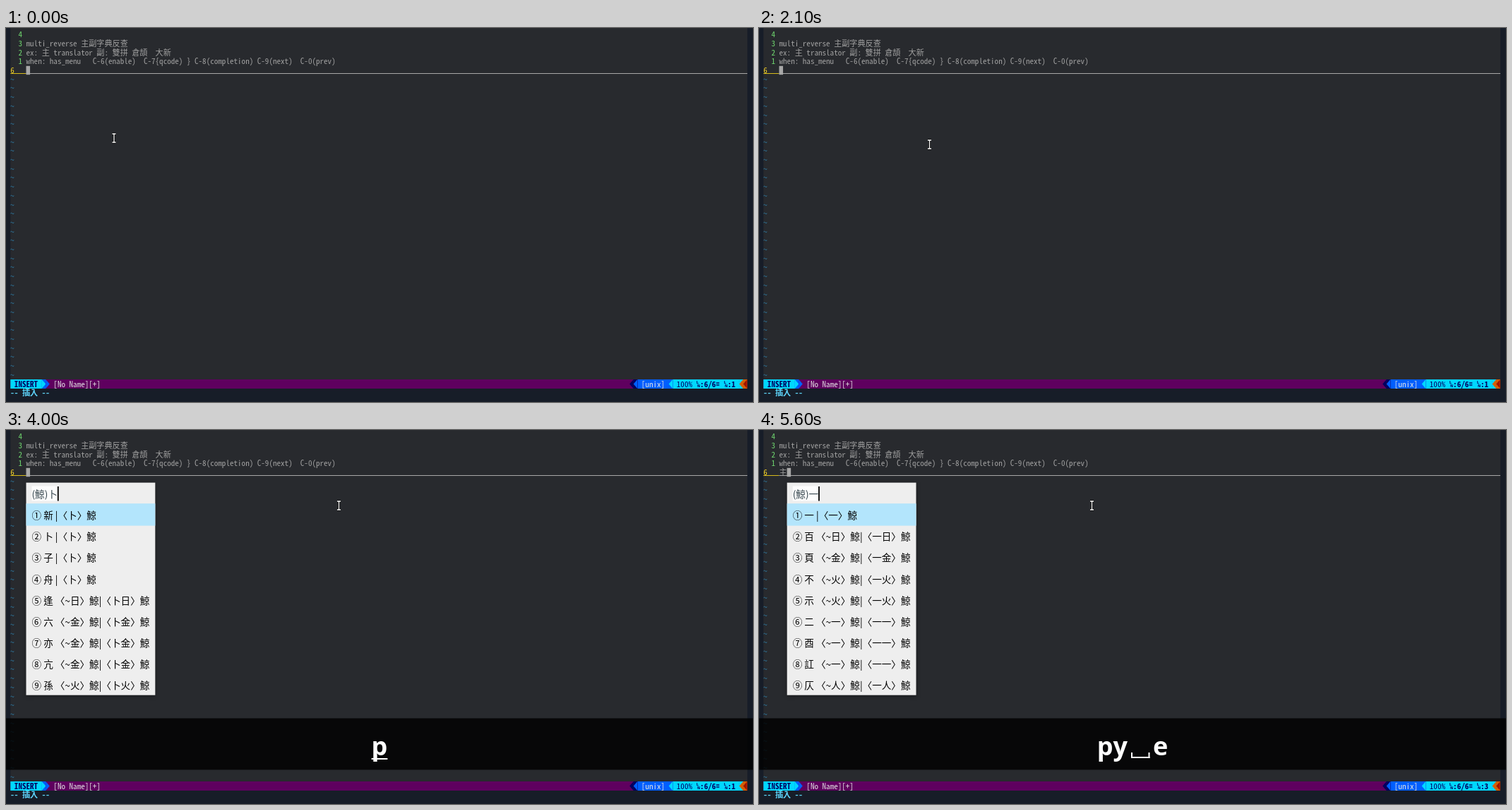
Animation of 1058x530 px, one loop 8 s. Source, as an HTML page with a canvas:

```html
<!DOCTYPE html>
<html lang="zh-Hant">
<head>
<meta charset="utf-8">
<style>
html, body { margin: 0; width: 100%; height: 100%; overflow: hidden; background: #171d28 }
canvas { display: block }
</style>
</head>
<body>
<canvas id="stage" width="1058" height="530"></canvas>
<script>
const ctx = document.getElementById('stage').getContext('2d');
const LOOP = 8000, CELL = 5.55, ROW = 12.7, LEFT = 6.3, RIGHT = 1050;
const MONO = '11.1px "Noto Sans Mono CJK TC", "Noto Sans Mono", monospace';
const HAN = '13.6px "Noto Sans CJK TC", "Noto Sans", sans-serif';
const KEYS = 'bold 36px "Noto Sans", sans-serif';

const col = n => LEFT + n * CELL;
const baseline = n => 13.2 + n * ROW;

function rect(x, y, w, h, color) {
  ctx.fillStyle = color;
  ctx.fillRect(x, y, w, h);
}
function text(str, x, y, color, font) {
  ctx.font = font;
  ctx.fillStyle = color;
  ctx.fillText(str, x, y);
}
const cells = (str, c, r, color, weight = '') =>
  text(str, col(c), baseline(r), color, weight + MONO);

const notes = [
  '',
  'multi_reverse 主副字典反查',
  'ex: 主 translator 副: 雙拼 倉頡  大新',
  'when: has_menu   C-6(enable)  C-7{qcode) } C-8(completion) C-9(next)  C-0(prev)'
];

// Candidate rows: "character code", where code follows the typed prefix.
const coded = (prefix, plain, rest) => [
  ...[...plain].map(c => `${c} |〈${prefix}〉鯨`),
  ...rest.split(' ').map(s => {
    const [c, ...code] = s, tail = code.join('');
    return `${c} 〈~${tail}〉鯨|〈${prefix}${tail}〉鯨`;
  })
];
const linked = '見田山 要魚女 題日人一金 動竹土大尸 任人水 席中中月 板木竹水 機木女戈 力大尸'
  .split(' ').map(s => `${s[0]} (聯)|〈${s.slice(1)}〉鯨`);

const menus = {
  ascii: { label: 'A' },
  han: { label: '中' },
  first: { preedit: '(鯨)卜', rows: coded('卜', '新卜子舟', '逢日 六金 亦金 亢金 孫火') },
  second: { preedit: '(鯨)卜土', rows: coded('卜土', '主', '遠口女 達廿手 逵金土 遨尸大 遶土山 逹土手 麈土火 遼火日') },
  linked: { preedit: '見[聯]', rows: linked },
  third: { preedit: '(鯨)一', rows: coded('一', '一', '百日 頁金 不火 示火 二一 酉一 訌一 仄人') }
};

const start = { at: 0, typed: '', column: 1 };
const changes = [
  { at: 900, menu: 'ascii', menuX: 28.5 },
  { at: 2000, menu: null },
  { at: 3100, typed: 'p', column: 2, keys: 'p' },
  { at: 3400, typed: '', column: 1, keys: '', menu: 'han' },
  { at: 3800, menu: null },
  { at: 4000, menu: 'first', keys: 'p', underline: true },
  { at: 4200, underline: false },
  { at: 4600, menu: 'second', keys: 'py', underline: true },
  { at: 4800, underline: false },
  { at: 5100, menu: 'linked', typed: '主', column: 3, keys: 'py␣', underline: true },
  { at: 5400, menuX: 39.7, underline: false },
  { at: 5600, menu: 'third', keys: 'py␣e' }
];
const stateAt = t => Object.assign({}, start, ...changes.filter(c => c.at <= t));

function pointerAt(t) {
  if (t >= 3600) return [471.5, 107];
  if (t >= 3400) return null;
  const path = [[900, 153, 156], [1200, 159, 155], [1400, 241.5, 165]];
  const now = Math.floor(t / 100) * 100;
  if (now <= path[0][0]) return path[0].slice(1);
  for (let i = 1; i < path.length; i++) {
    const [t0, x0, y0] = path[i - 1], [t1, x1, y1] = path[i];
    if (now <= t1) {
      const k = (now - t0) / (t1 - t0);
      return [x0 + (x1 - x0) * k, y0 + (y1 - y0) * k];
    }
  }
  return path[path.length - 1].slice(1);
}

function drawPointer([x, y]) {
  for (const [color, width] of [['#000', 3], ['#fff', 1.3]]) {
    ctx.strokeStyle = color;
    ctx.lineWidth = width;
    ctx.beginPath();
    ctx.moveTo(x - 2.5, y - 6);
    ctx.lineTo(x + 2.5, y - 6);
    ctx.moveTo(x, y - 6);
    ctx.lineTo(x, y + 6);
    ctx.moveTo(x - 2.5, y + 6);
    ctx.lineTo(x + 2.5, y + 6);
    ctx.stroke();
  }
}

function drawEditor({ typed }) {
  rect(0, 0, 1058, 530, '#171d28');
  rect(LEFT, 0, RIGHT - LEFT, 511, '#282a2e');
  notes.forEach((line, i) => {
    cells(String(4 - i), 2, i, '#6fd76f');
    cells(line, 4, i, '#a0a0a0');
  });
  cells('6', 0, 4, '#f5d327');
  rect(LEFT, 64, 22.2, 1, '#d7bb1c');
  rect(28.5, 64, RIGHT - 28.5, 1, '#a8a8a8');
  cells(typed, 4, 4, '#a0a0a0');
  const width = typed === '主' ? 2 : typed.length;
  rect(col(4 + width), 53.8, CELL, 12.4, '#a8a8a8');
  for (let r = 5; r < 39; r++) cells('~', 0, r, '#2f87b5');
}

function arrow(c, dir, color, back) {
  const x = col(c), tip = dir > 0 ? x + CELL : x, base = dir > 0 ? x : x + CELL;
  rect(x, 498, CELL + 0.3, 13, back);
  ctx.fillStyle = color;
  ctx.beginPath();
  ctx.moveTo(base, 498);
  ctx.lineTo(tip, 504.5);
  ctx.lineTo(base, 511);
  ctx.fill();
}

function stackedMark(c) {
  const font = 'bold 6px "Noto Sans Mono", monospace';
  text('L', col(c) + 0.3, 504, '#00005f', font);
  text('N', col(c) + 1.8, 509, '#00005f', font);
}

function drawStatus({ column }) {
  const cyan = '#00d7ff', blue = '#005fff', purple = '#5f005f', navy = '#00005f';
  const span = (a, b, color) => rect(col(a), 498, (b - a) * CELL + 0.3, 13, color);
  span(0, 188, purple);
  span(0, 8, cyan);
  span(160, 168, blue);
  span(169, 186, cyan);
  arrow(8, 1, cyan, blue);
  arrow(9, 1, blue, purple);
  arrow(158, -1, navy, purple);
  arrow(159, -1, blue, navy);
  arrow(168, -1, cyan, blue);
  arrow(186, -1, '#d75f00', cyan);
  arrow(187, -1, '#a01400', '#d75f00');
  cells('INSERT', 1, 39, navy, 'bold ');
  cells('[No Name][+]', 11, 39, '#e4e4e4');
  cells('[unix]', 161, 39, '#e4e4e4');
  cells('100%', 170, 39, navy);
  stackedMark(175);
  cells(':6/6', 176, 39, navy, 'bold ');
  for (const y of [502, 504, 506]) rect(col(180) + 0.6, y, 4.4, 1, navy);
  stackedMark(182);
  cells(':' + column, 183, 39, navy, 'bold ');
  cells('-- 插入 --', 0, 40, '#5fd7ff', 'bold ');
}

function drawMenu({ menu, menuX }) {
  const { label, preedit, rows = [] } = menus[menu];
  const pitch = 30.14, pad = 8, top = 74.6, x = menuX + pad;
  const lines = label ? [label] : [preedit, ...rows.map((r, i) => '①②③④⑤⑥⑦⑧⑨'[i] + ' ' + r)];
  ctx.font = HAN;
  const widths = lines.map(l => ctx.measureText(l).width);
  const width = Math.max(...widths) + 2 * pad;
  ctx.save();
  ctx.shadowColor = 'rgba(0,0,0,.45)';
  ctx.shadowBlur = 7;
  ctx.shadowOffsetY = 1;
  rect(menuX, top, width, lines.length * pitch - 0.3, '#eee');
  ctx.restore();
  if (preedit) {
    rect(x, 79.5, widths[0], 21, '#fcfcfc');
    rect(x + widths[0], 80, 1.8, 20.5, '#000');
    rect(menuX, 104.2, width, 31.4, '#b3e5fc');
  }
  lines.forEach((l, i) => text(l, x, 96 + i * pitch, preedit && !i ? '#37474f' : '#000', HAN));
}

function drawKeys({ keys, underline }) {
  rect(0, 408.5, 1058, 73, 'rgba(0,0,0,.83)');
  ctx.font = KEYS;
  const widths = [...keys].map(k => k === '␣' ? 36 : ctx.measureText(k).width);
  let x = 529 - widths.reduce((a, b) => a + b, 0) / 2;
  [...keys].forEach((k, i) => {
    if (k === '␣') {
      rect(x + 5, 457, 2, 8, '#fff');
      rect(x + 29.5, 457, 2, 8, '#fff');
      rect(x + 5, 463, 26.5, 2, '#fff');
    } else text(k, x, 461, '#fff', KEYS);
    if (underline && i === keys.length - 1) rect(x, 465, widths[i], 2, '#fff');
    x += widths[i];
  });
}

function draw(now) {
  const t = now % LOOP, state = stateAt(t), pointer = pointerAt(t);
  drawEditor(state);
  drawStatus(state);
  if (state.menu) drawMenu(state);
  if (state.keys !== undefined) drawKeys(state);
  if (pointer) drawPointer(pointer);
  requestAnimationFrame(draw);
}
requestAnimationFrame(draw);
</script>
</body>
</html>
```
